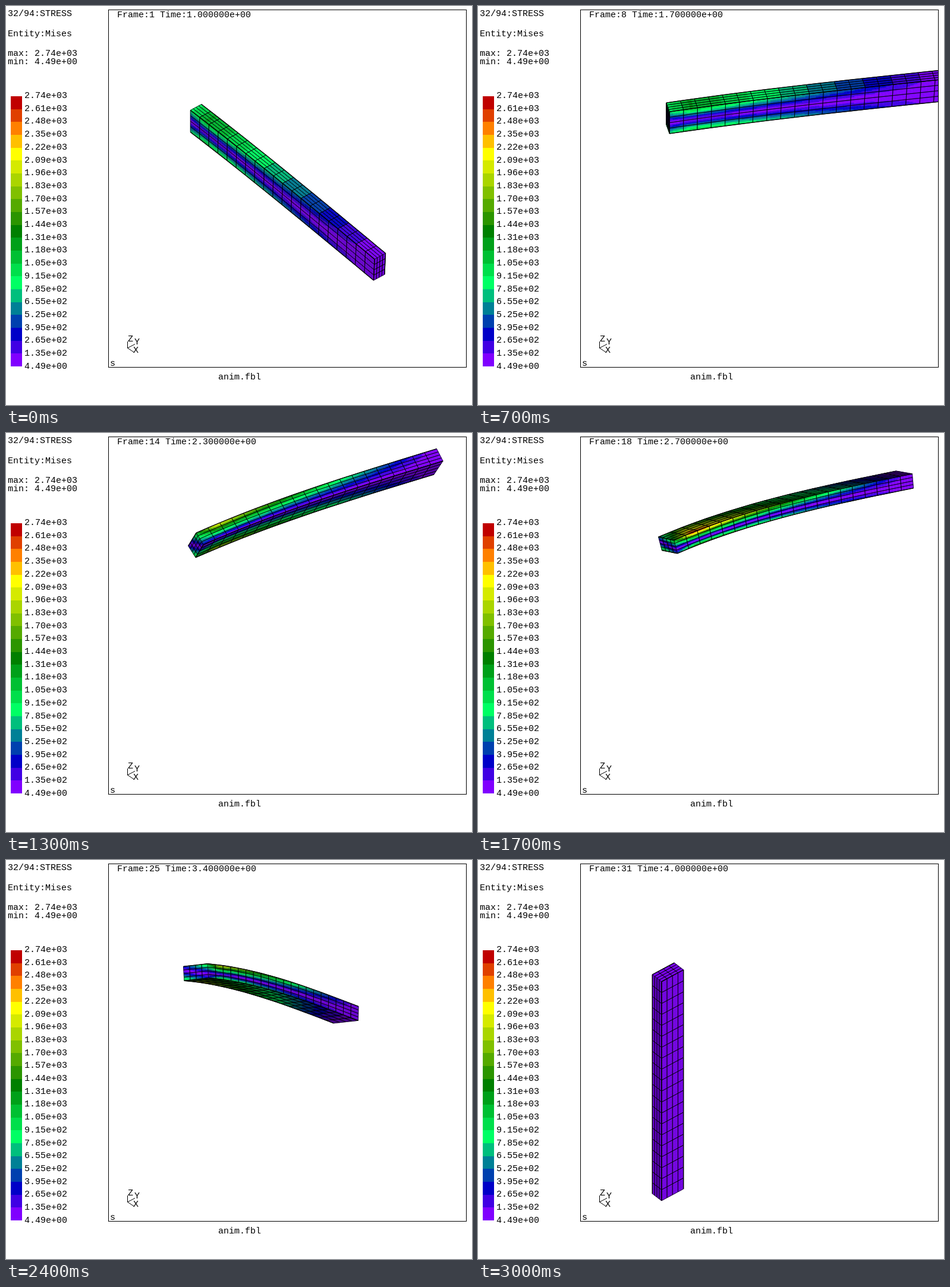
An HTML page with a canvas that plays this animation: 784x672 px, repeating every 3100 ms.

```html
<!DOCTYPE html>
<html>
<head>
<meta charset="utf-8">
<style>
html, body { margin: 0; width: 100%; height: 100%; overflow: hidden; background: #fff; }
canvas { display: block; }
</style>
</head>
<body>
<canvas id="stage" width="784" height="672"></canvas>
<script>
const ctx = document.getElementById('stage').getContext('2d');
const STEPS = 31, STEP_MS = 100;
const MIN = 4.49, MAX = 2736, BANDS = 21;

// Colour scale, top (highest stress) to bottom
const STOPS = [[0, 192, 0, 0], [2, 255, 128, 0], [4, 255, 255, 0], [10, 0, 128, 0],
  [14, 0, 255, 100], [18, 0, 0, 200], [20, 128, 0, 255]];
const palette = Array.from({ length: BANDS }, (_, i) => {
  const k = Math.max(1, STOPS.findIndex(s => s[0] >= i));
  const [p, ...from] = STOPS[k - 1], [q, ...to] = STOPS[k];
  return from.map((c, j) => c + (to[j] - c) * (i - p) / (q - p));
});
const rgb = (c, shade = 1) => `rgb(${c.map(x => Math.round(x * shade))})`;
const sci = (v, digits) => v.toExponential(digits).replace(/(\d)$/, '0$1');

// Vectors
const dot = (a, b) => a[0] * b[0] + a[1] * b[1] + a[2] * b[2];
const cross = (a, b) => [a[1] * b[2] - a[2] * b[1], a[2] * b[0] - a[0] * b[2], a[0] * b[1] - a[1] * b[0]];
const sub = (a, b) => a.map((x, i) => x - b[i]);
const mix = (a, b, t) => a.map((x, i) => x + (b[i] - x) * t);
const VIEW = [0.588, -0.492, 0.643];
const project = ([x, y, z]) => [319.5 + 309 * x + 369 * y, 189 + 237 * x - 198 * y - 369 * z];

function rotate(v, r) {
  const angle = Math.hypot(...r), n = r.map(x => x / (angle || 1));
  const c = Math.cos(angle), s = Math.sin(angle), nv = cross(n, v), d = dot(n, v) * (1 - c);
  return v.map((x, i) => x * c + nv[i] * s + n[i] * d);
}

// Rotation vectors reached after every ten steps
const Q = 2 * Math.PI / 3 / Math.sqrt(3);
const POSES = [[0, 0, 0], [0, 0, Math.PI / 2], [Q, Q, Q], [-Q, Q, Q]];

// Beam surfaces: cells along, then (a, b) -> [length, height, width]
const FACES = [
  [20, (a, b) => [a, 2 * b - 1, 1]],
  [20, (a, b) => [a, 1 - 2 * b, -1]],
  [20, (a, b) => [a, 1, 1 - 2 * b]],
  [20, (a, b) => [a, -1, 2 * b - 1]],
  [4, (a, b) => [1, 2 * a - 1, 2 * b - 1]],
  [4, (a, b) => [0, 2 * a - 1, 1 - 2 * b]]
];

// Cantilever under gravity, twice as high as wide
function makeBeam(step) {
  const k = Math.min(2, Math.floor(step / 10));
  const pose = mix(POSES[k], POSES[k + 1], step / 10 - k);
  const D = rotate([1, 0, 0], pose), H = rotate([0, 0, 1], pose), W = rotate([0, -1, 0], pose);
  const loadH = -H[2], loadW = -W[2], flex = 0.036;
  return {
    point([s, h, w]) {
      const bend = (3 * s * s - s ** 3) / 2 * flex, slope = (6 * s - 3 * s * s) / 2 * flex;
      const y = 0.05 * h, z = 0.025 * w;
      const along = s - slope * (y * loadH + 4 * z * loadW);
      const up = y + bend * loadH, side = z + 4 * bend * loadW;
      return D.map((d, i) => d * along + H[i] * up + W[i] * side);
    },
    stress([s, h, w]) {
      const end = Math.max(0, 1 - s / 0.08);
      return 10 + 1280 * (1 - s) *
        Math.abs((1 - 0.35 * end) * loadH * h + (1 - 0.6 * end) * 2 * loadW * w);
    }
  };
}

function trace(points) {
  ctx.beginPath();
  points.forEach(p => ctx.lineTo(...p));
}

function drawBeam(step) {
  const { point, stress } = makeBeam(step);
  ctx.save();
  ctx.beginPath();
  ctx.rect(173, 7, 601, 601);
  ctx.clip();
  for (const [cells, at] of FACES) {
    const quad = (a, b, da, db) =>
      [[a, b], [a + da, b], [a + da, b + db], [a, b + db]].map(p => point(at(...p)));
    const da = 1 / cells, db = 1 / 4, outlines = [];
    for (let i = 0; i < cells; i++) for (let j = 0; j < 4; j++) {
      const a = i * da, b = j * db, corners = quad(a, b, da, db);
      const normal = cross(sub(corners[2], corners[0]), sub(corners[3], corners[1]));
      const facing = dot(normal, VIEW) / Math.hypot(...normal);
      if (facing <= 0) continue;
      const shade = Math.min(1, 0.35 + 0.9 * facing);
      const outline = corners.map(project);
      outlines.push([outline, j]);
      const m = 4, n = 6;
      for (let u = 0; u < m; u++) for (let v = 0; v < n; v++) {
        const sa = a + u * da / m, sb = b + v * db / n;
        const value = stress(at(sa + da / m / 2, sb + db / n / 2));
        const band = Math.floor((value - MIN) / (MAX - MIN) * BANDS);
        const color = palette[BANDS - 1 - Math.max(0, Math.min(BANDS - 1, band))];
        ctx.fillStyle = ctx.strokeStyle = rgb(color, shade);
        ctx.lineWidth = 0.6;
        trace(quad(sa, sb, da / m, db / n).map(project));
        ctx.closePath();
        ctx.fill();
        ctx.stroke();
      }
    }
    ctx.strokeStyle = '#000';
    for (const [p, j] of outlines) {
      ctx.lineWidth = 0.7;
      trace(p);
      ctx.closePath();
      ctx.stroke();
      ctx.lineWidth = 1.3;
      if (j === 0) { trace([p[0], p[1]]); ctx.stroke(); }
      if (j === 3) { trace([p[2], p[3]]); ctx.stroke(); }
    }
  }
  ctx.restore();
}

function draw(step) {
  ctx.fillStyle = '#fff';
  ctx.fillRect(0, 0, 784, 672);
  const edge = i => Math.round(152 + i * 455 / BANDS);
  palette.forEach((c, i) => {
    ctx.fillStyle = rgb(c);
    ctx.fillRect(8, edge(i), 19, edge(i + 1) - edge(i));
  });

  drawBeam(step);

  ctx.fillStyle = ctx.strokeStyle = '#000';
  ctx.lineWidth = 1;
  ctx.strokeRect(172.5, 6.5, 602, 602);
  trace([[204.5, 565], [204.5, 576], [217, 569.5]]);
  ctx.moveTo(204.5, 576);
  ctx.lineTo(215, 583);
  ctx.stroke();

  ctx.font = '15px "Liberation Mono", monospace';
  const text = (s, x, y) => ctx.fillText(s, x, y);
  text('32/94:STRESS', 3, 17);
  text('Entity:Mises', 3, 51);
  text('max: ' + sci(MAX, 2), 3, 84);
  text('min: ' + sci(MIN, 2), 3, 98);
  for (let i = 0; i <= BANDS; i++)
    text(sci(MAX - (MAX - MIN) * i / BANDS, 2), 31, Math.round(155 + i * 21.7));
  text(`Frame:${step + 1} Time:${sci(1 + step / 10, 6)}`, 187, 19);
  text('anim.fbl', 357, 629);
  text('s', 175, 606);
  text('Z', 205, 565);
  text('Y', 216, 570);
  text('X', 214, 584);
}

let shown = -1;
const start = performance.now();
function tick() {
  const step = Math.floor((performance.now() - start) / STEP_MS) % STEPS;
  if (step !== shown) draw(shown = step);
  requestAnimationFrame(tick);
}
tick();
</script>
</body>
</html>
```
